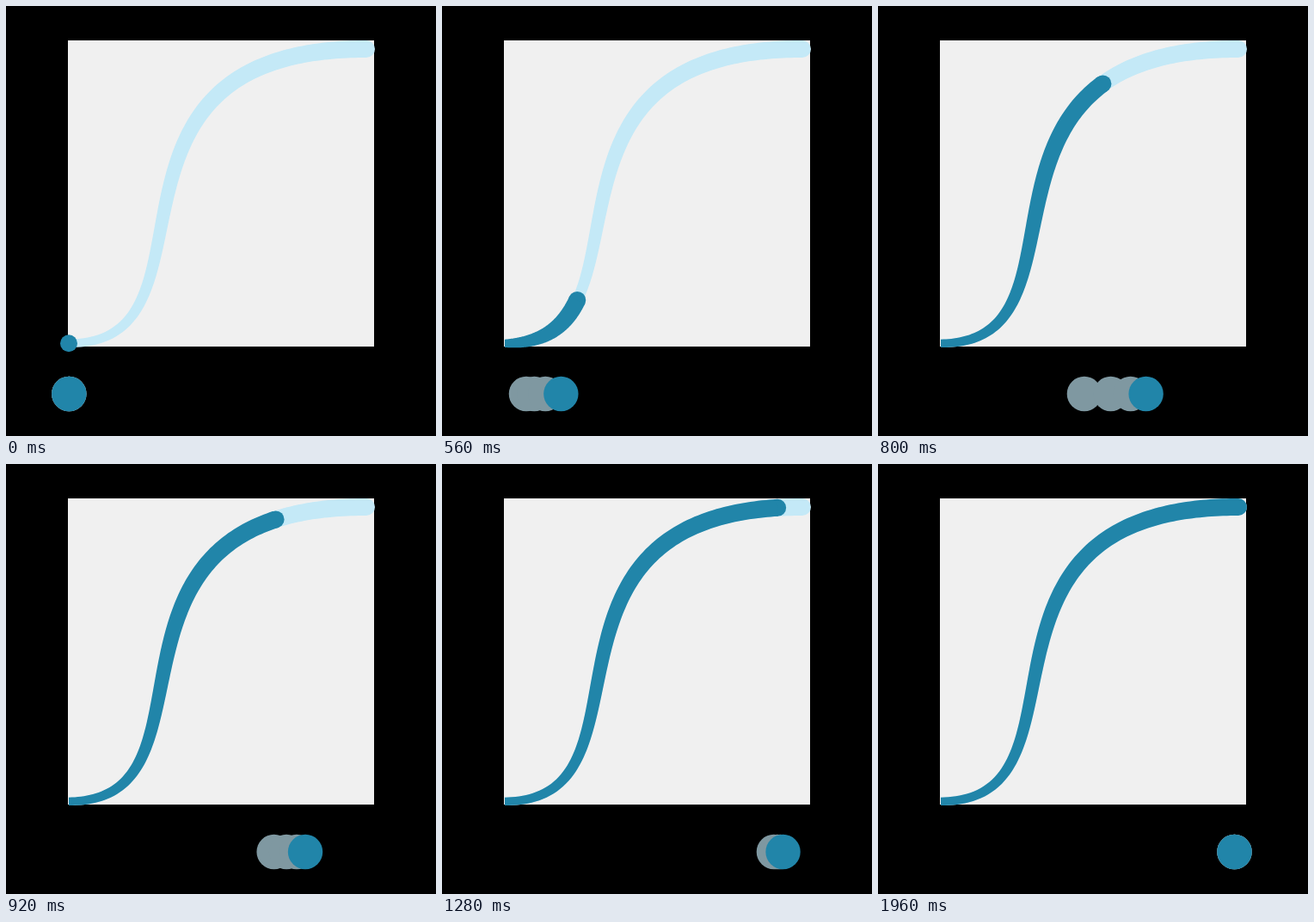
These frames come from a looping animation (500x500 px, 3000 ms). An HTML page with a canvas:

```html
<!DOCTYPE html>
<html lang="en">
<head>
<meta charset="utf-8">
<title>Easing curve</title>
<style>
  html, body { margin: 0; width: 100%; height: 100%; overflow: hidden; background: #000; }
  canvas { display: block; width: 500px; height: 500px; }
</style>
</head>
<body>
<canvas id="stage" width="500" height="500"></canvas>
<script>
const ctx = document.getElementById('stage').getContext('2d');

const LOOP = 3000, STEP = 40, DELAY = 95, DURATION = 1780;
const BLUE = '#2185a9', PALE = '#c4e9f7', TRAIL = '#7f98a1', PANEL = '#f0f0f0';
const START = { x: 73, y: 392.3 }, END = { x: 419, y: 50 };
const BALL = { from: 73.3, to: 414.5, y: 451, r: 20.2 };
const EASE_X1 = 0.55;
const SAMPLES = 400;

// cubic-bezier(EASE_X1, 0, 0, 1) and its plot
const bezier = (t, a, b) => 3 * (1 - t) ** 2 * t * a + 3 * (1 - t) * t * t * b + t ** 3;
const mix = (a, b, k) => a + (b - a) * k;

function ease(x) {
  if (x <= 0) return 0;
  if (x >= 1) return 1;
  let lo = 0, hi = 1;
  for (let i = 0; i < 30; i++) {
    const mid = (lo + hi) / 2;
    if (bezier(mid, EASE_X1, 0) < x) lo = mid; else hi = mid;
  }
  return bezier(lo, 0, 1);
}

const curve = [];
for (let i = 0; i <= SAMPLES; i++) {
  const t = i / SAMPLES;
  const x = mix(START.x, END.x, bezier(t, EASE_X1, 0));
  const y = mix(START.y, END.y, bezier(t, 0, 1));
  const prev = curve[i - 1];
  curve.push({ x, y, len: prev ? prev.len + Math.hypot(x - prev.x, y - prev.y) : 0 });
}
const total = curve[SAMPLES].len;

function pointAt(fraction) {
  const len = fraction * total;
  const i = Math.max(1, curve.findIndex(p => p.len >= len - 1e-6));
  const a = curve[i - 1], b = curve[i];
  const k = (len - a.len) / (b.len - a.len);
  const step = b.len - a.len;
  return {
    x: mix(a.x, b.x, k), y: mix(a.y, b.y, k),
    nx: -(b.y - a.y) / step, ny: (b.x - a.x) / step
  };
}

function disc(x, y, r, color) {
  ctx.fillStyle = color;
  ctx.beginPath();
  ctx.arc(x, y, r, 0, 2 * Math.PI);
  ctx.fill();
}

// Stroke that widens from its start to a round head
function taperedStroke(progress, color) {
  const head = pointAt(progress);
  disc(head.x, head.y, 10, color);
  if (progress < 0.002) return;
  const left = [], right = [], n = 120;
  for (let i = 0; i <= n; i++) {
    const u = i / n, p = pointAt(u * progress);
    const half = 4.6 + 5.4 * Math.sin(u * Math.PI / 2);
    left.push([p.x + p.nx * half, p.y + p.ny * half]);
    right.unshift([p.x - p.nx * half, p.y - p.ny * half]);
  }
  ctx.beginPath();
  for (const [x, y] of left.concat(right)) ctx.lineTo(x, y);
  ctx.fill();
}

const progressAt = time => ease((time - DELAY) / DURATION);
const ballX = time => mix(BALL.from, BALL.to, progressAt(time));

function draw(time) {
  ctx.fillStyle = '#000';
  ctx.fillRect(0, 0, 500, 500);
  ctx.fillStyle = PANEL;
  ctx.fillRect(72, 40, 356, 356);

  taperedStroke(1, PALE);
  taperedStroke(progressAt(time), BLUE);

  for (let i = 3; i > 0; i--) disc(ballX(time - i * STEP), BALL.y, BALL.r, TRAIL);
  disc(ballX(time), BALL.y, BALL.r, BLUE);
}

const origin = performance.now();
function frame() {
  const time = (performance.now() - origin) % LOOP;
  draw(Math.floor(time / STEP) * STEP);
  requestAnimationFrame(frame);
}
frame();
</script>
</body>
</html>
```
